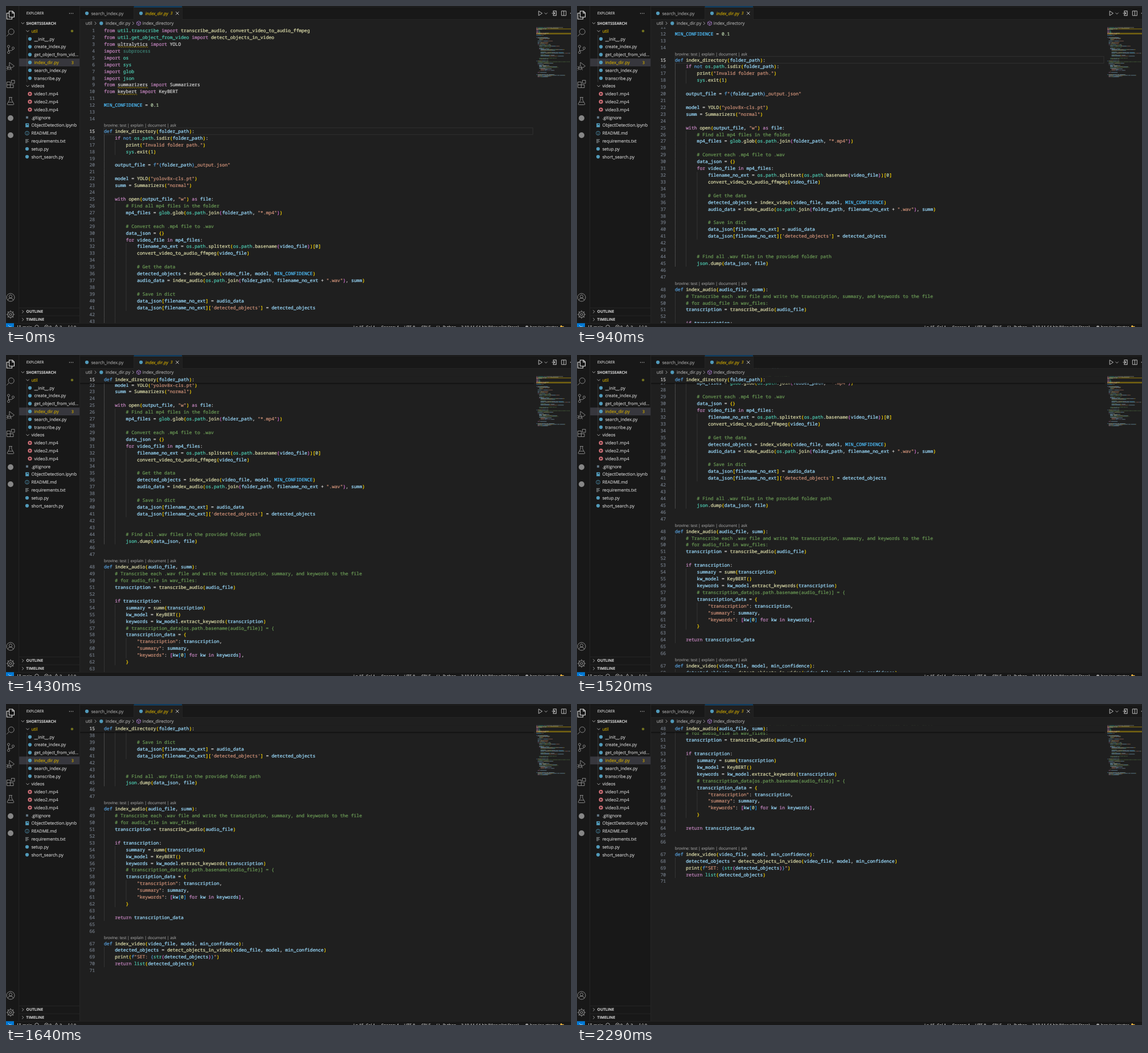
An HTML page that plays this animation: 992x564 px, repeating every 3.18 s.

```html
<!DOCTYPE html>
<html lang="en">
<head>
<meta charset="utf-8">
<title>Code editor scrolling</title>
<style>
html, body { margin: 0; width: 100%; height: 100%; overflow: hidden; background: #181818; }
svg { display: block; width: 992px; height: 564px; }
text { white-space: pre; font-family: "Open Sans", "Noto Sans", sans-serif; text-rendering: geometricPrecision; }
text, tspan { fill: currentColor; stroke: currentColor; stroke-width: .14px; }
.code, .code tspan { stroke-width: .24px; }
.code { font-family: "Noto Sans Mono", "DejaVu Sans Mono", monospace; font-size: 8.044px; }
</style>
</head>
<body>
<svg id="stage" viewBox="0 0 992 564" xmlns="http://www.w3.org/2000/svg"></svg>
<script>
const SOURCE = `from util.transcribe import transcribe_audio, convert_video_to_audio_ffmpeg
from util.get_object_from_video import detect_objects_in_video
from ultralytics import YOLO
import subprocess
import os
import sys
import glob
import json
from summarizers import Summarizers
from keybert import KeyBERT

MIN_CONFIDENCE = 0.1


def index_directory(folder_path):
    if not os.path.isdir(folder_path):
        print("Invalid folder path.")
        sys.exit(1)

    output_file = f"{folder_path}_output.json"

    model = YOLO("yolov8x-cls.pt")
    summ = Summarizers("normal")

    with open(output_file, "w") as file:
        # Find all mp4 files in the folder
        mp4_files = glob.glob(os.path.join(folder_path, "*.mp4"))

        # Convert each .mp4 file to .wav
        data_json = {}
        for video_file in mp4_files:
            filename_no_ext = os.path.splitext(os.path.basename(video_file))[0]
            convert_video_to_audio_ffmpeg(video_file)

            # Get the data
            detected_objects = index_video(video_file, model, MIN_CONFIDENCE)
            audio_data = index_audio(os.path.join(folder_path, filename_no_ext + ".wav"), summ)

            # Save in dict
            data_json[filename_no_ext] = audio_data
            data_json[filename_no_ext]['detected_objects'] = detected_objects


        # Find all .wav files in the provided folder path
        json.dump(data_json, file)


def index_audio(audio_file, summ):
    # Transcribe each .wav file and write the transcription, summary, and keywords to the file
    # for audio_file in wav_files:
    transcription = transcribe_audio(audio_file)

    if transcription:
        summary = summ(transcription)
        kw_model = KeyBERT()
        keywords = kw_model.extract_keywords(transcription)
        # transcription_data[os.path.basename(audio_file)] = {
        transcription_data = {
            "transcription": transcription,
            "summary": summary,
            "keywords": [kw[0] for kw in keywords],
        }

    return transcription_data


def index_video(video_file, model, min_confidence):
    detected_objects = detect_objects_in_video(video_file, model, min_confidence)
    print(f"SET: {str(detected_objects)}")
    return list(detected_objects)
`.split("\n");

const LINE = 11.915, LENS = 10, TOP = 37.2, LEFT = 172, CHAR = 4.8264, WHEEL = 31.35;
const LOOP = 3180;
const WHEEL_TIMES = [780, 850, 890, 930, 960, 1000, 1040,
  1430, 1480, 1520, 1550, 1580, 1610, 1640, 2110, 2160, 2200, 2250, 2290];
const DEFS = [15, 48, 67], CURRENT = 15;
const C = { plain: "#d4d4d4", ctrl: "#c586c0", word: "#569cd6", fn: "#dcdcaa", variable: "#9cdcfe",
  type: "#4ec9b0", str: "#ce9178", num: "#b5cea8", note: "#6a9955", constant: "#4fc1ff",
  unused: "#3d8074", warn: "#cca700", py: "#519aba", border: "#2b2b2b", editor: "#1f1f1f", side: "#181818" };
const BRACKETS = ["#ffd700", "#da70d6", "#179fff"];

// --- syntax colouring ---
const WORDS = {};
const addWords = (list, color) => list.split(" ").forEach(w => WORDS[w] = color);
addWords("from import if with as for in return", C.ctrl);
addWords("def not", C.word);
addWords("util transcribe get_object_from_video os sys glob json path str list", C.type);
addWords("transcribe_audio convert_video_to_audio_ffmpeg detect_objects_in_video", C.fn);
addWords("ultralytics summarizers keybert YOLO Summarizers KeyBERT", C.plain);
addWords("MIN_CONFIDENCE", C.constant);
addWords("subprocess", C.unused);

const TOKEN = /#.*|f?"[^"]*"|'[^']*'|[A-Za-z_]\w*|\d[\d.]*|[()[\]{}]|\s+|./g;
let depth = 0;

function wordColor(word, next) {
  if (next === "(" && !["str", "list"].includes(word)) return C.fn;
  return WORDS[word] || C.variable;
}

function tokenize(code) {
  const out = [];
  for (const m of code.matchAll(TOKEN)) {
    const t = m[0];
    if (t[0] === "#") out.push([t, C.note]);
    else if (t.startsWith('f"')) {
      out.push(["f", C.word]);
      for (const part of t.slice(1).split(/(\{[^}]*\})/)) {
        if (part[0] === "{") out.push(["{", C.word], ...tokenize(part.slice(1, -1)), ["}", C.word]);
        else out.push([part, C.str]);
      }
    }
    else if (/^["']/.test(t)) out.push([t, C.str]);
    else if (/^[A-Za-z_]/.test(t)) out.push([t, wordColor(t, code[m.index + t.length])]);
    else if (/^\d/.test(t)) out.push([t, C.num]);
    else if (/[([{]/.test(t)) out.push([t, BRACKETS[depth++ % 3]]);
    else if (/[)\]}]/.test(t)) out.push([t, BRACKETS[--depth % 3]]);
    else out.push([t, C.plain]);
  }
  return out;
}

const indentOf = s => s.search(/\S|$/);
const lines = SOURCE.map((s, i) => ({
  n: i + 1, indent: indentOf(s), tokens: tokenize(s.trim()),
  top: TOP + i * LINE + LENS * DEFS.filter(d => d <= i + 1).length
}));

// --- drawing helpers ---
const text = (x, cy, size, color, s, extra = "") =>
  `<text x="${x}" y="${cy + size * .355}" font-size="${size}" color="${color}" ${extra}>${s}</text>`;
const rect = (x, y, w, h, fill, extra = "") =>
  `<rect x="${x}" y="${y}" width="${w}" height="${h}" fill="${fill}" ${extra}/>`;
const dot = (x, y, r, fill) => `<circle cx="${x}" cy="${y}" r="${r}" fill="${fill}"/>`;
const path = (d, stroke, w = .8, fill = "none") =>
  `<path d="${d}" stroke="${stroke}" stroke-width="${w}" fill="${fill}"/>`;
const icon = (x, y, d, stroke = "#868686", w = 1) => `<g transform="translate(${x} ${y})">${path(d, stroke, w)}</g>`;
const ring = r => `M${-r} 0a${r} ${r} 0 1 0 ${2 * r} 0a${r} ${r} 0 1 0 ${-2 * r} 0`;
const chevron = (x, y, down) => icon(x, y, down ? "M-2.6-1.3L0 1.3L2.6-1.3" : "M-1.3-2.6L1.3 0L-1.3 2.6", "#c0c0c0", .8);

function codeLine(line, top) {
  const y = top + 8.9;
  const spans = line.tokens.map(([s, c]) => `<tspan color="${c}">${s}</tspan>`).join("");
  return `<text class="code" x="156.2" y="${y}" text-anchor="end" color="${line.n === CURRENT ? "#cccccc" : "#6e7681"}">${line.n}</text>`
    + `<text class="code" x="${LEFT + line.indent * CHAR}" y="${y}">${spans}</text>`;
}

function guides(line, i) {
  const next = SOURCE.slice(i).find(s => s.trim());
  const level = (next ? indentOf(next) : 0) / 4;
  let out = "";
  for (let k = 0; k < level; k++)
    out += rect(LEFT + k * 4 * CHAR, line.top, .65, LINE + .05, k === 0 && i < 45 ? "#606060" : "#404040");
  return out;
}

function squiggle(n, word) {
  const x = LEFT + SOURCE[n - 1].indexOf(word) * CHAR, y = lines[n - 1].top + 10.8;
  let d = `M${x} ${y}`;
  for (let k = 0; k < word.length * CHAR / 3.8 - .5; k++) d += "q.95-1.6 1.9 0t1.9 0";
  return path(d, C.warn, .7);
}

function codePane() {
  const lens = DEFS.map(n =>
    text(LEFT, lines[n - 1].top - 4.5, 6.8, "#999999", "brovine: test | explain | document | ask")).join("");
  return rect(LEFT, lines[CURRENT - 1].top, 753, LINE, "none", 'stroke="#303030" stroke-width="1"')
    + lines.map(guides).join("") + lines.map(l => codeLine(l, l.top)).join("") + lens
    + squiggle(3, "ultralytics") + squiggle(9, "summarizers") + squiggle(10, "keybert");
}

function minimap() {
  const row = 1.254, col = .627, x0 = 931;
  let out = [3, 9, 10].map(n => rect(x0, TOP + (n - 1) * row, 61, row, C.warn, 'opacity=".55"')).join("");
  for (const l of lines) {
    let x = x0 + l.indent * col;
    for (const [s, c] of l.tokens)
      for (const run of s.split(/( +)/)) {
        if (run.trim()) out += rect(x, TOP + (l.n - 1) * row + .15, run.length * col, .9, c, 'opacity=".5"');
        x += run.length * col;
      }
  }
  return out;
}

function sticky(n) {
  return `<g id="sticky${n}">` + rect(130, TOP, 797, LINE, C.editor)
    + rect(130, TOP + LINE, 797, 3, "url(#shade)") + codeLine(lines[n - 1], TOP) + "</g>";
}

// --- fixed parts of the window ---
function activityBar() {
  const gear = Array.from({ length: 8 }, (_, k) => {
    const a = k * Math.PI / 4, c = Math.cos(a), s = Math.sin(a);
    return `M${5 * c} ${5 * s}L${7.2 * c} ${7.2 * s}`;
  }).join("");
  return rect(0, 0, 22.4, 557, C.side) + rect(22.4, 0, .7, 557, C.border)
    + icon(8, 16, "M-2.5-7H3.5L6.5-4V3.5H-2.5ZM3-7V-3.5H6.5M-2.5-3.5H-6.5V7H2.5V3.5", "#e0e0e0", 1.1)
    + icon(8, 46, "M-2.5 2.5A5 5 0 1 1 0 4A5 5 0 0 1-2.5 2.5L-7 7.3")
    + icon(8, 76, "M-5.5-5a2 2 0 1 0 4 0a2 2 0 1 0-4 0M-5.5 5.5a2 2 0 1 0 4 0a2 2 0 1 0-4 0M2.5-2a2 2 0 1 0 4 0a2 2 0 1 0-4 0M-3.5-3V3.5M4.5 0Q4 2.5-3 2.5")
    + icon(8, 106, "M-2-1V-7L6.5-.5L0 4M-5 1.5a2.6 2.6 0 0 1 5 0V4a2.6 2.6 0 0 1-5 0ZM-5 2.5H0M-7.2 0L-5 1.7M-7.5 3.5H-5M-7 7L-5 5M1 1L0 2M2 6.5L0 5")
    + icon(8, 137, "M-6.5-3.5H-.5V6.5H-6.5ZM-6.5 1.5H5V6.5H-.5M1.5-6.5H7V-1H1.5Z")
    + icon(8, 167, "M-3-6.5H3M-1.8-6.5V-2L-5.8 5Q-6 6.5-4.5 6.5H4.5Q6 6.5 5.8 5L1.8-2V-6.5M-3.8 2H3.8")
    + dot(8, 197, 5, "#868686") + dot(8, 227, 5, "#868686")
    + icon(8, 512, ring(7) + "M-2.6-1.6a2.6 2.6 0 1 0 5.2 0a2.6 2.6 0 1 0-5.2 0M-4.8 5Q-4 1.2 0 1.2T4.8 5")
    + icon(8, 542, ring(5) + ring(2) + gear, "#868686", 1.2);
}

function fileIcon(kind, x, y) {
  switch (kind) {
    case "py": return dot(x, y, 3.1, C.py);
    case "mp4": return dot(x, y, 3.6, "#cc6d75") + path(`M${x - 1.1} ${y - 1.8}L${x + 1.9} ${y}L${x - 1.1} ${y + 1.8}Z`, "none", 0, C.side);
    case "git": return rect(x - 2, y - 2, 4, 4, "#5d7280");
    case "nb": return rect(x - 2.8, y - 3.5, 6, 7, C.py, 'rx=".6"') + rect(x - .7, y - 2.2, 2.8, 1.3, C.side);
    case "info": return icon(x, y, ring(3.4) + "M0-2V-1.1M0-.3V2", C.py, .8);
    default: return icon(x, y, "M-3-2.6H3M-3-.8H1.5M-3 1H3M-3 2.8H.5", "#a8b0b4", .8);
  }
}

function sidebar() {
  const rowY = k => 30.2 + 13.8 * k;
  const files = [
    [2, "py", "__init__.py", 1], [3, "py", "create_index.py", 1], [4, "py", "get_object_from_vid...", 1],
    [5, "py", "index_dir.py", 1], [6, "py", "search_index.py", 1], [7, "py", "transcribe.py", 1],
    [9, "mp4", "video1.mp4", 1], [10, "mp4", "video2.mp4", 1], [11, "mp4", "video3.mp4", 1],
    [12, "git", ".gitignore", 0], [13, "nb", "ObjectDetection.ipynb", 0], [14, "info", "README.md", 0],
    [15, "txt", "requirements.txt", 0], [16, "py", "setup.py", 0], [17, "py", "short_search.py", 0]];
  const bold = 'font-weight="700"';
  let out = rect(23.1, 0, 106.2, 557, C.side) + rect(129.2, 0, .7, 557, C.border)
    + text(35.8, 12.8, 6.4, "#cccccc", "EXPLORER")
    + [111.5, 114.5, 117.5].map(x => dot(x, 13, .7, "#cccccc")).join("")
    + chevron(29.5, 30.2, true) + text(35.6, 30.2, 6.75, "#cccccc", "SHORTSSEARCH", bold)
    + rect(23.1, rowY(5) - 6.9, 106, 13.8, "#37373d")
    + rect(36.6, rowY(1) + 6.9, .6, 6 * 13.8, "#505050")
    + chevron(38, rowY(1), true) + text(44.4, rowY(1), 7.7, C.warn, "util") + dot(116, rowY(1), 2.3, "#70701f")
    + chevron(38, rowY(8), true) + text(44.4, rowY(8), 7.7, "#cccccc", "videos")
    + text(114.8, rowY(5), 7.2, C.warn, "3");
  for (const [k, kind, name, nested] of files)
    out += fileIcon(kind, nested ? 42 : 37, rowY(k))
      + text(nested ? 49.4 : 44.4, rowY(k), 7.7, k === 5 ? C.warn : "#cccccc", name);
  [["OUTLINE", 537], ["TIMELINE", 550.8]].forEach(([name, y]) =>
    out += rect(23.1, y - 7, 106, .7, C.border) + chevron(29.5, y, false) + text(35.6, y, 6.7, "#cccccc", name, bold));
  return out;
}

function tabsAndCrumbs() {
  return rect(130, 0, 862, 23.6, C.side) + rect(130, 23, 862, .7, C.border) + rect(130, 1, 862, .6, C.border)
    + rect(224.5, 1.6, 84.5, 22.2, C.editor) + rect(224.5, 1.2, 84.5, .8, "#0078d4")
    + rect(224, 1.6, .6, 22, C.border) + rect(309, 1.6, .6, 22, C.border)
    + fileIcon("py", 142, 12.8) + text(149.4, 12.8, 7.7, "#9d9d9d", "search_index.py")
    + fileIcon("py", 237, 12.8) + text(244.4, 12.8, 7.7, C.warn, "index_dir.py", 'font-style="italic"')
    + text(288.4, 12.8, 7.2, C.warn, "3", 'font-style="italic"')
    + icon(300.8, 12.8, "M-2.6-2.6L2.6 2.6M2.6-2.6L-2.6 2.6", "#e0e0e0", .9)
    + icon(938, 12.8, "M-2.8-4L3.4 0L-2.8 4Z", "#cccccc", .9) + chevron(948, 13, true)
    + icon(962.5, 12.8, "M-1.5-1.5V-4H3.5V4H-1.5V1.5M-4 0H1M-.8-1.8L1 0L-.8 1.8", "#cccccc", 1.1)
    + icon(979.3, 12.8, "M-4-4H4V4H-4ZM0-4V4", "#cccccc", .9)
    + dot(991.3, 12.8, .7, "#cccccc")
    + rect(130, 23.7, 862, TOP - 23.7, C.editor)
    + text(139.8, 30.3, 7.7, "#a9a9a9", "util") + chevron(157, 30.4, false)
    + fileIcon("py", 167.3, 30.4) + text(175, 30.3, 7.7, "#a9a9a9", "index_dir.py") + chevron(223.2, 30.4, false)
    + icon(233, 30.4, "M0-3.8L3.4-1.9V1.9L0 3.8L-3.4 1.9V-1.9ZM-3.4-1.9L0 0L3.4-1.9M0 0V3.8", "#b180d7", .8)
    + text(239.5, 30.3, 7.7, "#a9a9a9", "index_directory");
}

function statusBar() {
  const items = [[29, "main"], [76, "0"], [94, "3"], [119, "0"], [610, "Ln 15, Col 1"], [659, "Spaces: 4"],
    [699, "UTF-8"], [729, "CRLF"], [755, "{ }"], [767, "Python"],
    [799, "3.10.11 64-bit (Morvelist Store)"], [920, "brovine starter"]];
  return rect(0, 557, 992, 7, C.side) + rect(0, 557, 992, .6, C.border) + rect(0, 557.3, 14, 7, "#0078d4")
    + icon(6.5, 564, "M-2.5-3L.2-.4L-2.5 2M3-2L.5.5L3 3", "#ffffff", .8)
    + icon(22.5, 564, "M-2-3V3M2-2.5a1 1 0 1 0 .1 0M-2 1Q2 1 2-.5", "#cccccc", .8)
    + icon(54, 564, ring(3.3), "#cccccc", .8)
    + icon(71, 564, ring(3.3) + "M-1.4-1.4L1.4 1.4M1.4-1.4L-1.4 1.4", "#cccccc", .8)
    + icon(88.5, 564, "M0-3.5L3.5 3H-3.5Z", "#cccccc", .8)
    + icon(113, 564, "M0-1V4M-2.2-3Q-4-1-2.2 1M2.2-3Q4-1 2.2 1", "#cccccc", .8)
    + dot(914.5, 564, 2.6, "#a0a0a0")
    + icon(976, 563.5, "M-3 0H3.4M-2.4-1.4H0", "#f0b840", 1.6)
    + items.map(([x, s]) => text(x, 564.2, 7.15, "#cccccc", s)).join("");
}

document.getElementById("stage").innerHTML =
  `<defs><linearGradient id="shade" x2="0" y2="1"><stop stop-color="#000" stop-opacity=".55"/>
  <stop offset="1" stop-color="#000" stop-opacity="0"/></linearGradient></defs>`
  + rect(0, 0, 992, 564, C.editor) + `<g id="doc">${codePane()}</g>`
  + sticky(15) + sticky(48) + minimap()
  + tabsAndCrumbs() + sidebar() + activityBar() + statusBar();

// --- motion ---
const doc = document.getElementById("doc");
const scopes = [[15, 45], [48, 64]].map(([first, last]) => ({
  node: document.getElementById("sticky" + first),
  start: lines[first - 1].top - TOP, end: lines[last - 1].top - TOP
}));

function draw(ms) {
  const scroll = WHEEL * WHEEL_TIMES.filter(t => t <= ms).length;
  doc.setAttribute("transform", `translate(0 ${-scroll})`);
  for (const s of scopes)
    s.node.setAttribute("display", scroll > s.start && scroll <= s.end ? "inline" : "none");
}

const began = performance.now();
function tick() {
  draw((performance.now() - began) % LOOP);
  requestAnimationFrame(tick);
}
tick();
</script>
</body>
</html>
```
